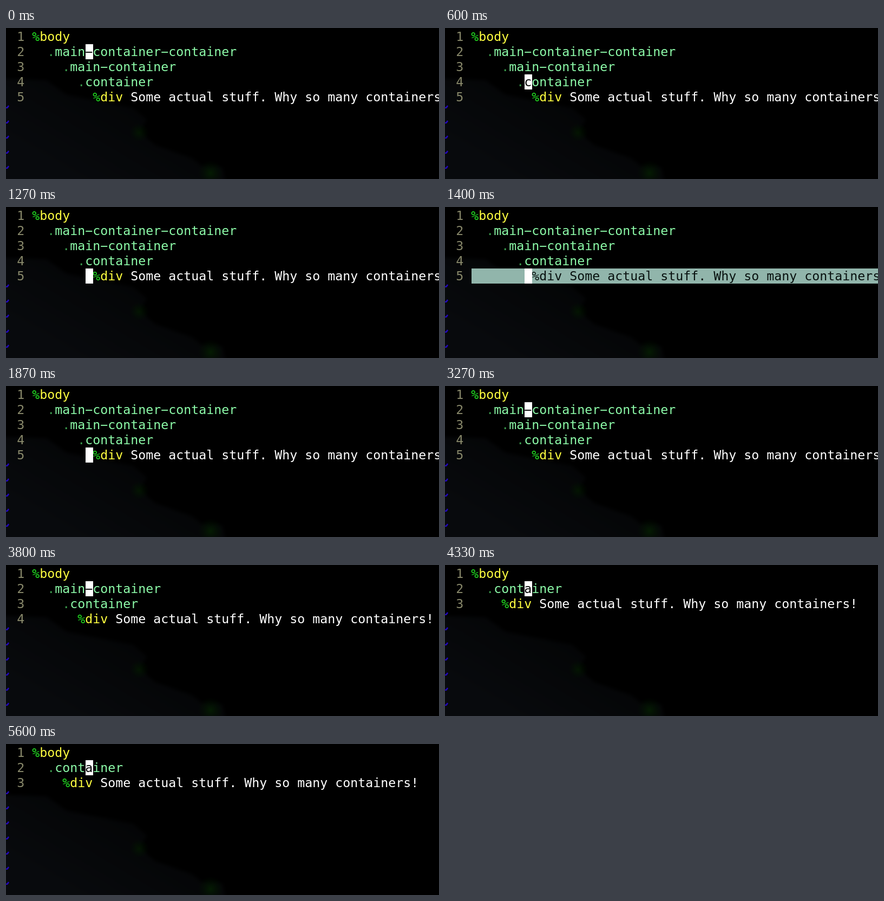
Write an HTML page with a canvas that moves like this. It is 800 by 280 pixels and loops after 5740 ms.

```html
<!DOCTYPE html>
<html lang="en">
<head>
<meta charset="utf-8">
<title>Editor session</title>
<style>
  html, body { margin: 0; width: 100%; height: 100%; overflow: hidden; background: #000; }
  canvas { display: block; }
</style>
</head>
<body>
<canvas id="stage" width="800" height="280"></canvas>
<script>
const ctx = document.getElementById('stage').getContext('2d');

const LOOP = 5740;
const CELL = 14, LINE = 28, LEFT = 49, TOP = 2, BASE = 22, BEARING = -0.7;
const ROWS = 10, CURSOR_COL = 7;
const COLOR = {
  number: '#88886a', percent: '#22e322', tag: '#ffff40', dot: '#3a9a4c',
  cls: '#8cfaa8', text: '#ffffff', select: '#91b5ab', tilde: '#2408c0'
};

const classes = ['main-container-container', 'main-container', 'container'];
const note = ' Some actual stuff. Why so many containers!';

// [time, cursor row, wrappers removed, line selected]
const steps = [
  [0, 1, 0, false],
  [330, 2, 0, false],
  [600, 3, 0, false],
  [1270, 4, 0, false],
  [1400, 4, 0, true],
  [1870, 4, 0, false],
  [2400, 3, 0, false],
  [2670, 2, 0, false],
  [2930, 1, 0, false],
  [3470, 1, 1, false],
  [4000, 1, 2, false]
];

// A line is an indent followed by [text, colour] runs.
function buildLines(removed) {
  const kept = classes.slice(removed);
  return [
    { indent: 0, runs: [['%', COLOR.percent], ['body', COLOR.tag]] },
    ...kept.map((name, i) => ({
      indent: 2 * (i + 1),
      runs: [['.', COLOR.dot], [name, COLOR.cls]]
    })),
    {
      indent: 2 * (kept.length + 1),
      runs: [['%', COLOR.percent], ['div', COLOR.tag], [note, COLOR.text]]
    }
  ];
}

const colX = col => LEFT + col * CELL;
const rowY = row => TOP + row * LINE;

// The terminal face has a hyphen as wide as a minus sign.
function write(text, x, row, color) {
  ctx.fillStyle = color;
  ctx.fillText(text.replace(/-/g, '\u2212'), x + BEARING, rowY(row) + BASE);
}

function glow(x, y, r, color) {
  const g = ctx.createRadialGradient(x, y, 0, x, y, r);
  g.addColorStop(0, color);
  g.addColorStop(1, 'rgba(0,20,0,0)');
  ctx.fillStyle = g;
  ctx.fillRect(x - r, y - r, 2 * r, 2 * r);
}

function drawBackdrop() {
  ctx.fillStyle = '#000';
  ctx.fillRect(0, 0, 800, 280);
  const edge = [[-10, 94], [75, 97], [112, 124], [235, 148], [260, 170], [246, 192],
    [275, 217], [345, 242], [362, 256], [400, 258], [406, 290], [-10, 290]];
  const shade = ctx.createLinearGradient(60, 240, 150, 90);
  shade.addColorStop(0, '#080a0d');
  shade.addColorStop(1, '#040506');
  ctx.save();
  ctx.filter = 'blur(3px)';
  ctx.fillStyle = shade;
  ctx.beginPath();
  edge.forEach(([x, y]) => ctx.lineTo(x, y));
  ctx.fill();
  ctx.restore();
  glow(246, 194, 18, 'rgba(4,28,0,.7)');
  glow(378, 269, 24, 'rgba(4,36,0,.7)');
}

function drawTilde(row) {
  const y = rowY(row);
  ctx.strokeStyle = COLOR.tilde;
  ctx.lineWidth = 2.5;
  ctx.beginPath();
  ctx.moveTo(0, y + 6);
  ctx.lineTo(2.5, y + 5.5);
  ctx.lineTo(5, y + 2);
  ctx.stroke();
}

function drawLine(line, row, selected) {
  write(String(row + 1), LEFT - 2 * CELL, row, COLOR.number);
  if (selected) {
    ctx.fillStyle = COLOR.select;
    ctx.fillRect(LEFT, rowY(row), 800 - LEFT, LINE);
  }
  let col = line.indent;
  for (const [text, color] of line.runs) {
    write(text, colX(col), row, selected ? '#08110f' : color);
    col += text.length;
  }
}

function drawCursor(line, row) {
  const plain = ' '.repeat(line.indent) + line.runs.map(run => run[0]).join('');
  ctx.fillStyle = '#fff';
  ctx.fillRect(colX(CURSOR_COL), rowY(row), CELL, LINE);
  write(plain[CURSOR_COL], colX(CURSOR_COL), row, '#000');
}

function draw(time) {
  const [, row, removed, selected] = steps.filter(step => step[0] <= time).pop();
  const lines = buildLines(removed);
  ctx.font = '23.25px "DejaVu Sans Mono", monospace';
  drawBackdrop();
  lines.forEach((line, i) => drawLine(line, i, selected && i === row));
  for (let i = lines.length; i < ROWS; i++) drawTilde(i);
  drawCursor(lines[row], row);
}

const start = performance.now();
function tick() {
  draw((performance.now() - start) % LOOP);
  requestAnimationFrame(tick);
}
tick();
</script>
</body>
</html>
```
